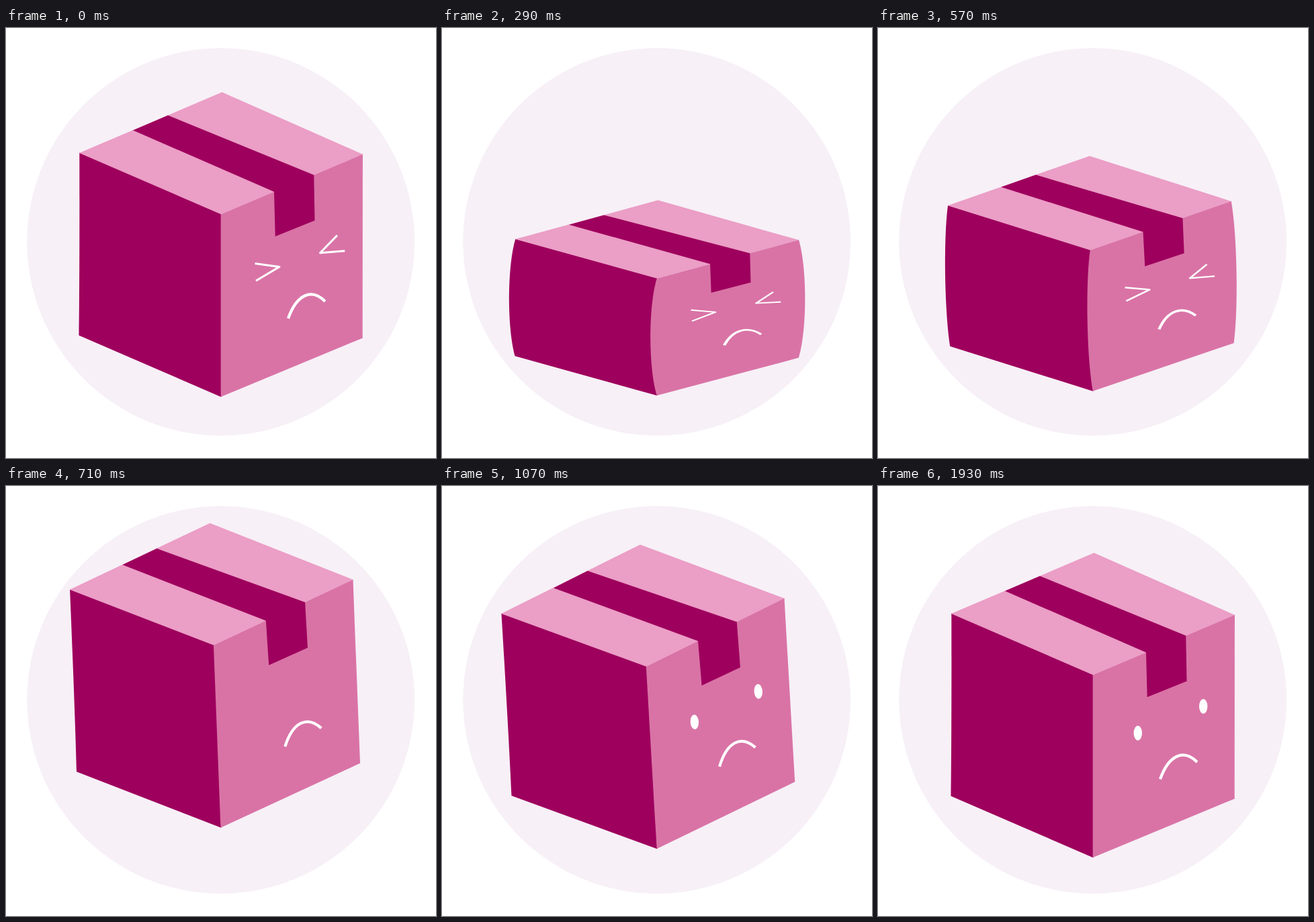
An HTML page for the animation above (3570 ms loop, 640x640 px).

```html
<!DOCTYPE html>
<html lang="en">
<head>
<meta charset="utf-8">
<title>Sad parcel</title>
<style>
  html, body { margin: 0; width: 100%; height: 100%; overflow: hidden; background: #fff; }
  svg { display: block; width: 100%; height: 100%; }
  .line { fill: none; stroke: #fff; }
</style>
</head>
<body>
<svg viewBox="0 0 640 640">
  <circle cx="319.7" cy="318.3" r="288.4" fill="#f7f0f7"/>
  <g id="box">
    <path id="left" fill="#9e005d"/>
    <path id="right" fill="#d973a6"/>
    <path fill="#eb9ec6" d="M321.5 99.5L531 192L320 281.3L109 190Z"/>
    <path fill="#9e005d" d="M189 156.3L241 134L458.3 222.7L459.5 290.6L400.7 314.2L399 247.8Z"/>
    <path class="line" stroke-width="4.2" d="M420 436.3C433 400 455 391 475 411"/>
    <g id="squint" class="line" stroke-width="3" stroke-linejoin="round">
      <path d="M370.5 354.4L407 359.4L372 380.3"/>
      <path d="M493 312.6L467.5 338.7L504.3 335.7"/>
    </g>
    <g id="eyes" fill="#fff">
      <ellipse cx="386.8" cy="367.8" rx="6.2"/>
      <ellipse cx="484.2" cy="328" rx="6.2"/>
    </g>
  </g>
</svg>
<script>
const LOOP = 3570, STEPS = 50;
const EYES_GONE = 10, BLINK_START = 21, BLINK_LENGTH = 6;

// One value per step; the last value holds until the loop ends.
const stretch = [1, 1, .945, .805, .641, .538, .533, .632, .772, .92, 1, 1, 1, 1, 1, 1, 1, 1, .77, 1];
const lift = [4, 4, 4.3, 5, 6, 7, 8.3, 10, 12.5, 26, 44.5, 65, 77, 66, 40, 13, 2, 0];
const tilt = [0, 0, 0, 0, 0, -.05, -.25, -.6, -1.08, -1.7, -2.27, -2.8, -3.15, -3.4, -3.5, -3.35, -2.2, -.7, 0];

const el = id => document.getElementById(id);
const [box, left, right, squint, eyes] = ['box', 'left', 'right', 'squint', 'eyes'].map(el);
const at = (table, step) => table[Math.min(step, table.length - 1)];

// Upright edge from (x1, y1) to (x2, y2), bowed sideways in its middle.
function edge(x1, y1, x2, y2, bow) {
  const shift = bow * 4 / 3, h = y2 - y1;
  return `C${x1 + shift} ${y1 + h * .24} ${x1 + shift} ${y1 + h * .76} ${x2} ${y2}`;
}

function eyeOpening(step) {
  if (step <= EYES_GONE) return 0;
  if (step < BLINK_START) return Math.min(1, (step - EYES_GONE) * .4);
  const phase = Math.min(1, (step - BLINK_START) / BLINK_LENGTH);
  return (1 + Math.cos(phase * 2 * Math.PI)) / 2;
}

function draw(step) {
  const s = at(stretch, step), bow = (1 - s) * 26.5;
  box.setAttribute('transform',
    `translate(320 ${553 - at(lift, step)}) rotate(${at(tilt, step)}) scale(1 ${s}) translate(-320 -553)`);
  left.setAttribute('d',
    `M320.6 553L320.6 280L109.3 189.5${edge(109.5, 189.5, 108.5, 461.4, -bow)}L319.8 553Z`);
  right.setAttribute('d',
    `M319.7 281${edge(319.7, 281, 319.7, 553, -bow)}L530.8 465.4${edge(530.8, 465.4, 531, 191.5, bow)}Z`);

  squint.style.display = step < EYES_GONE ? '' : 'none';
  const open = eyeOpening(step);
  eyes.style.display = open > .01 ? '' : 'none';
  for (const eye of eyes.children) eye.setAttribute('ry', 11 * open);
}

const start = performance.now();
function tick() {
  const time = (performance.now() - start) % LOOP;
  draw(Math.min(STEPS - 1, Math.floor((time + 5) * STEPS / LOOP)));
  requestAnimationFrame(tick);
}
tick();
</script>
</body>
</html>
```
